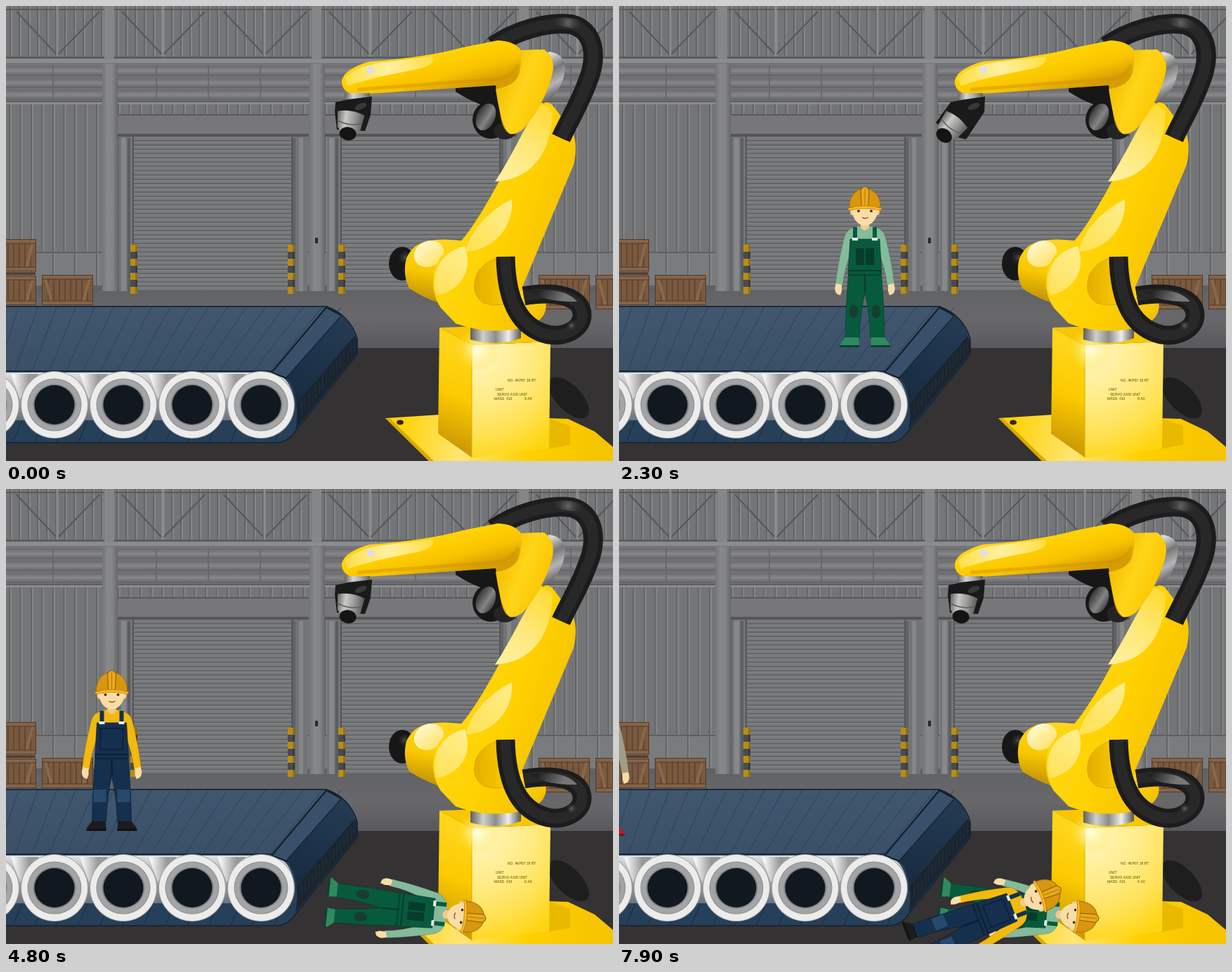
An HTML page with a canvas for the animation above (8000 ms loop, 864 px wide and 648 px high).

```html
<!DOCTYPE html>
<html lang="en">
<head>
<meta charset="utf-8">
<title>Factory line</title>
<style>
html, body { margin: 0; width: 100%; height: 100%; overflow: hidden; background: #343233; }
canvas { display: block; }
</style>
</head>
<body>
<canvas id="stage" width="864" height="648"></canvas>
<script>
const W = 864, H = 648, LOOP = 8000, STEP = 100;
const view = document.getElementById('stage').getContext('2d');
const scene = document.createElement('canvas');
scene.width = W;
scene.height = H;
let g = scene.getContext('2d');

function rect(x, y, w, h, fill) { g.fillStyle = fill; g.fillRect(x, y, w, h); }
function shape(d, fill, line, width = 1) {
  const p = new Path2D(d);
  if (fill) { g.fillStyle = fill; g.fill(p); }
  if (line) { g.strokeStyle = line; g.lineWidth = width; g.stroke(p); }
}
function oval(x, y, rx, ry, fill, turn = 0) {
  g.beginPath();
  g.ellipse(x, y, rx, ry, turn, 0, 7);
  g.fillStyle = fill;
  g.fill();
}
function line(x1, y1, x2, y2, color, width = 1) {
  g.beginPath();
  g.moveTo(x1, y1);
  g.lineTo(x2, y2);
  g.strokeStyle = color;
  g.lineWidth = width;
  g.stroke();
}
function ramp(x1, y1, x2, y2, ...colors) {
  const r = g.createLinearGradient(x1, y1, x2, y2);
  colors.forEach((c, i) => r.addColorStop(i / (colors.length - 1), c));
  return r;
}
function glow(x, y, r, ...colors) {
  const s = g.createRadialGradient(x, y, 0, x, y, r);
  colors.forEach((c, i) => s.addColorStop(i / (colors.length - 1), c));
  return s;
}

// ---- hall ----
function ribs(x, y, w, h, gap) {
  for (let i = x + 4; i < x + w; i += gap) {
    rect(i, y, 2, h, '#626567');
    rect(i + 2, y, 2, h, '#858688');
  }
}
function bay(x) {
  ribs(x, 0, 282, 72, 13);
  line(x, 5, x + 282, 5, '#5a5b5d', 2);
  for (const [a, b] of [[12, 70], [130, 70], [157, 215], [275, 215]])
    line(x + a, 8, x + b, 70, '#55575a', 2);
  line(x + 70, 0, x + 70, 72, '#8c8d8f', 3);
  line(x + 215, 0, x + 215, 72, '#8c8d8f', 3);
  for (let i = 0; i < 3; i++)
    rect(x, 85 + i * 17, 282, 15, ramp(0, 85 + i * 17, 0, 100 + i * 17, '#6a6a6d', '#87878b', '#626265'));
  for (let i = 60; i < 282; i += 74) rect(x + i, 84, 2, 50, '#68696c');
}
function door(x) {
  rect(x - 20, 186, 268, 220, '#737476');
  rect(x - 17, 188, 7, 218, '#87888a');
  rect(x - 8, 188, 4, 218, '#5c5e60');
  rect(x + 226, 188, 5, 218, '#606264');
  rect(x + 236, 188, 6, 218, '#858688');
  rect(x, 186, 226, 221, '#78797b');
  for (let y = 191; y < 405; y += 6.1) {
    rect(x, y, 226, 2, '#616365');
    rect(x, y + 2, 226, 1, '#868788');
  }
  line(x, 186, x, 407, '#545658', 2);
  line(x + 226, 186, x + 226, 407, '#545658', 2);
  rect(x - 24, 154, 274, 31, '#777779');
  rect(x - 24, 154, 274, 2, '#595a5c');
  rect(x - 24, 182, 274, 4, '#545557');
}
function column(x) {
  rect(x, 0, 14, 76, '#858688');
  rect(x - 3, 82, 22, 324, ramp(x - 3, 0, x + 19, 0, '#747576', '#878889', '#838485', '#67686a'));
}
function bollard(x) {
  for (let i = 0; i < 7; i++)
    rect(x, 340 + i * 10, 10, 10, i % 2 ? '#4a4a50' : '#b98c17');
  rect(x + 7, 340, 3, 70, 'rgba(0,0,0,.2)');
}
function crate(x, y, h = 43) {
  rect(x, y, 73, h, '#79593f');
  for (let i = 9; i < 70; i += 8) line(x + i, y + 6, x + i, y + h - 6, '#5c4330', 1.5);
  line(x + 5, y + 5, x + 14, y + h - 5, '#8a694a', 4);
  line(x + 68, y + 5, x + 59, y + h - 5, '#8a694a', 4);
  rect(x, y, 73, 6, '#85644a');
  rect(x, y + h - 6, 73, 6, '#85644a');
  g.strokeStyle = '#503a29';
  g.lineWidth = 1;
  g.strokeRect(x + .5, y + .5, 72, h - 1);
  line(x, y + 6, x + 73, y + 6, '#503a29');
  line(x, y + h - 6, x + 73, y + h - 6, '#503a29');
}
function hall() {
  rect(0, 0, W, 406, '#747577');
  [-142, 153, 448, 743].forEach(bay);
  rect(0, 72, W, 3, '#5b5c5e');
  rect(0, 75, W, 6, '#8b8c8d');
  rect(0, 135, W, 2, '#5b5d5f');
  rect(0, 137, W, 3, '#8a8b8c');
  ribs(0, 140, W, 212, 15.5);
  rect(0, 350, W, 2, '#5e6062');
  rect(0, 352, W, 48, '#7a7b7d');
  ribs(0, 353, W, 46, 31);
  rect(0, 398, W, 8, '#5f6062');
  door(181);
  door(477);
  [140, 435, 730].forEach(column);
  rect(440, 330, 4, 8, '#29292b');
  rect(0, 406, W, 81, ramp(0, 406, 0, 487, '#626366', '#68686b', '#59595d'));
  rect(0, 487, W, 161, '#343233');
  [177, 401, 473].forEach(bollard);
  crate(-30, 332, 46);
  rect(0, 379, 42, 4, '#55402f');
  crate(-30, 384, 42);
  crate(51, 383);
  crate(758, 383, 49);
  crate(839, 383, 49);
}

// ---- conveyor ----
function conveyor() {
  shape('M0 427H456Q490 440 500 474V496L410 608Q400 622 383 622H0Z', '#27405a');
  for (let x = 10; x < 400; x += 31) line(x + 14, 588, x, 621, '#172a3d');
  shape('M0 521H372Q400 522 408 552L360 590H0Z', ramp(0, 521, 0, 592, '#e2e2e2', '#a4a4a4', '#68717b'));
  shape('M0 428H456L378 522H0Z', ramp(0, 428, 0, 522, '#40576f', '#3a5067'));
  for (let x = -10; x < 450; x += 27) {
    const lean = 30 + Math.max(0, x) * .1;
    line(x + 28, 429, x + 28 - lean, 519, '#2d4156');
  }
  shape('M456 429L478 441L399 530L378 522Z', '#38506a', '#111c27', 2);
  shape('M478 441Q491 452 496 470L413 566Q411 540 399 530Z', ramp(470, 450, 415, 560, '#233a52', '#182c41'));
  shape('M496 470Q501 475 500 494L412 603Q416 585 413 566Z', '#1a2530');
  for (let i = 0; i < 16; i++) line(496 - i * 5, 474 + i * 6, 496 - i * 5, 492 + i * 6, '#25333f');
  shape('M0 428H456Q490 440 500 474V496L410 608Q400 622 383 622H0', null, '#142231', 1.5);
  line(0, 520, 380, 520, '#18293a', 2);
  for (let x = -29; x < 400; x += 98) {
    const sheen = ramp(x + 40, 0, x + 62, 0, '#f4f4f4', '#999');
    if (x < 340) shape(`M${x + 36} 524H${x + 76}L${x + 49} 560Z`, sheen);
    oval(x, 568, 48, 48, '#9c9c9c');
    oval(x, 568, 47, 47, '#ececec');
    oval(x, 568, 38.5, 37.5, '#8c8d8f');
    oval(x, 568, 37.5, 36.5, '#a3a4a6');
    oval(x, 568, 30.5, 29.5, '#808285');
    oval(x, 568, 28.5, 28, '#12181f');
  }
}

// ---- robot ----
function hose(d, width) {
  g.lineCap = 'butt';
  shape(d, null, '#1d1c1d', width);
  shape(d, null, '#292829', width * .55);
}
function tinyText(s, x, y) {
  g.font = '5px "Liberation Sans", Arial, sans-serif';
  g.fillStyle = '#5e4a08';
  g.fillText(s, x, y);
}
function base() {
  oval(801, 558, 37, 18, '#1f1e1f', .8);
  shape('M540 587L618 582L800 588L838 606L864 628V648H602Z', ramp(560, 590, 840, 640, '#ffd205', '#ffe573', '#ffd000', '#f6c400'));
  shape('M540 587L602 648H609L547 588Z', '#dba800');
  oval(561, 593, 5, 3.5, '#322909');
  shape('M770 586L803 598V625L770 631Z', '#e9b900');
  shape('M617 458L663 483V643L615 609Z', ramp(655, 490, 612, 615, '#ffd51a', '#fbca00', '#cf9c05'));
  shape('M663 483L775 478L773 630L663 643Z', glow(668, 488, 165, '#fffbe2', '#fff1a3', '#ffea80', '#ffe152', '#ffd510'));
  shape('M617 458L710 455L775 478L663 483Z', '#f8c700');
  line(663, 483, 663, 643, '#e0af00');
  oval(672, 490, 32, 30, glow(672, 490, 32, 'rgba(255,255,225,.95)', 'rgba(255,240,140,.5)', 'rgba(255,220,30,0)'));
  tinyText('NO. 4KP07 18 RT', 714, 535);
  tinyText('UNIT', 697, 548);
  tinyText('SERVO AXIS UNIT', 699, 555);
  tinyText('MASS  410', 695, 561);
  tinyText('6 AX', 738, 561);
  shape('M661 457H733V473Q700 486 661 475Z', ramp(661, 0, 733, 0, '#5f5e5b', '#cfcfcb', '#8d8c88', '#eee', '#55544f'));
}
function lowerArm() {
  oval(564, 367, 19, 24, '#181718');
  oval(568, 360, 9, 12, glow(568, 358, 12, '#4a4a4a', 'rgba(24,23,24,0)'));
  shape('M600 335Q620 330 652 335L640 430Q600 420 574 402Q564 382 570 359Q580 338 600 335Z',
    ramp(610, 332, 594, 425, '#ffd61c', '#f9c800', '#b98a0a'));
  oval(602, 353, 22, 18, ramp(590, 340, 614, 370, '#fff7cc', '#ffe165'), -.45);
  shape('M645 338C680 300 725 205 754 145Q764 132 777 140L805 177Q815 195 808 226L735 400L768 420Q773 444 745 456Q690 471 640 452L619 430Q602 405 611 372Q621 346 645 338Z',
    ramp(645, 300, 780, 350, '#ffd60f', '#ffd100', '#f6c300'));
  shape('M755 145C724 202 710 230 696 250C743 248 777 214 778 150Q766 136 755 145Z', ramp(700, 245, 775, 150, '#fff0a0', '#ffe878', '#ffdb35'));
  shape('M720 275C684 294 660 322 654 350C697 347 723 312 720 275Z', ramp(720, 280, 656, 350, '#ffec8a', '#ffe152'));
  shape('M653 342C617 350 603 384 613 412C646 405 666 378 653 342Z', ramp(650, 340, 614, 410, '#ffee8f', '#ffe258'));
  shape('M718 357Q684 357 670 382Q660 410 680 423Q705 432 730 415Z', ramp(666, 0, 725, 0, '#e3ae00', '#ffd100'), '#d9a800', 1);
  oval(746, 425, 22, 24, ramp(725, 410, 765, 445, '#ffd820', '#f3bf00'));
  hose('M737 413C782 405 820 413 820 440C820 461 794 472 772 468C734 459 712 425 711 357', 27);
  shape('M745 406C780 402 802 407 813 421C785 421 766 419 745 406Z', ramp(760, 404, 790, 422, '#242324', '#777'));
  oval(805, 455, 9, 6, glow(805, 455, 9, '#5f5f5f', 'rgba(30,29,30,0)'), -.7);
}
function upperArm() {
  hose('M694 57C725 35 770 22 804 26C838 34 843 72 827 110C816 140 800 166 790 188', 28);
  oval(802, 24, 25, 7, glow(800, 24, 24, '#656565', 'rgba(40,39,40,0)'), .15);
  shape('M640 117L702 112L708 145Q680 148 640 122Z', '#181718');
  oval(690, 162, 26, 27, '#181718');
  oval(683, 158, 13, 20, ramp(670, 150, 700, 170, '#2c2c2c', '#858585', '#1c1c1c'), .4);
  oval(710, 178, 16, 12, '#252425');
  shape('M772 65Q794 67 796 87Q793 123 765 139L753 130Z', ramp(765, 75, 792, 125, '#d8d8d8', '#777', '#b5b5b5', '#5f5f5f'));
  shape('M700 49Q724 50 733 63L766 62Q782 74 778 95Q770 132 740 171Q729 184 717 182Q708 178 704 158L697 113L532 124L495 126Q477 122 478 106Q482 89 518 79Q600 73 650 59Z',
    ramp(600, 57, 618, 126, '#ffd719', '#ffd000', '#f9c200', '#d69c04'));
  shape('M733 63L766 62Q782 74 778 95Q770 132 740 171Q729 184 717 182Q705 173 697 118Q721 115 729 100Q735 83 733 63Z',
    ramp(705, 100, 770, 125, '#f3bf00', '#ffd51a', '#fac700'));
  shape('M483 103Q494 88 530 81L607 72Q612 84 585 90C550 97 520 102 486 114Z', ramp(485, 105, 605, 75, '#ffe04a', '#fff0a0', '#ffdf48'));
  oval(519, 91, 6, 6, '#e3dfe0');
  shape('M500 119L700 104Q724 98 729 83', null, 'rgba(205,145,0,.45)', 5);
  rect(482, 124, 36, 13, ramp(482, 0, 518, 0, '#646464', '#d4d4d4', '#a5a5a5', '#636363'));
}
function wrist(tilted) {
  shape(tilted ? 'M472 137L486 134L521 129L520 151L494 190L470 184L451 166Z'
               : 'M469 137L487 133L521 129L519 155L511 178L471 176L468 151Z', '#1b1a1b');
  g.save();
  g.translate(tilted ? 473 : 489, tilted ? 171 : 165);
  g.rotate(tilted ? .65 : .14);
  shape('M-19 -13Q0 -19 20 -12L17 10Q10 17 0 18Q-11 17 -16 9Z', ramp(-20, 0, 20, 0, '#5d5d5d', '#c8c8c6', '#979795', '#5b5a59'));
  shape('M-18 0Q0 7 18 0', null, '#625f5c', 1.5);
  oval(0, 17, 12, 9.5, '#151415');
  g.restore();
  oval(505, 143, 9, 4, '#393839', -.4);
}

function flame(long) {
  g.save();
  g.filter = 'blur(9px)';
  shape('M463 168C430 182 385 225 347 275V306C400 300 447 265 464 215Z', 'rgba(151,122,23,.55)');
  g.filter = 'blur(4px)';
  shape('M458 183C420 202 385 235 351 276V306C400 300 438 255 466 188Z', 'rgba(207,73,25,.83)');
  g.filter = 'blur(1px)';
  if (long) {
    shape('M383 268L120 531L394 280Z', ramp(380, 270, 120, 531, 'rgba(255,182,20,.9)', 'rgba(218,85,20,.55)', 'rgba(207,73,25,0)'));
  }
  shape('M457 183Q423 242 350 294L353 303Q435 256 467 187Z', ramp(464, 185, 350, 300, '#ff9b10', '#ffc414', '#ff9c13'));
  shape('M462 185Q428 243 352 297', null, '#ffe252', 3);
  g.restore();
}

// ---- workers, drawn around their middle, 230 px tall ----
const GREEN = { shirt: '#84bb9a', suit: '#075b3c', dark: '#063c2d', shoe: '#2f8a60', sole: '#123f2f', knee: '#153e31' };
const NAVY = { shirt: '#f2b90e', suit: '#15304e', dark: '#0b1d32', shoe: '#1c1b1d', sole: '#111', knee: '#28486c' };
const RED = { shirt: '#a29d86', suit: '#962023', dark: '#65191b', shoe: '#b51d22', sole: '#731316', knee: '#731b1e' };
const SKIN = '#f8dda6';

function half(c) {
  shape('M13 -57Q27 -55 30 -40Q38 -8 42 24L32 27Q29 0 18 -25Z', c.shirt, 'rgba(0,0,0,.18)', .8);
  shape('M33 25L41 23Q45 32 40 38L35 40L33 34Z', SKIN);
  shape('M-1 5H23Q27 50 28 101H8Q7 65 -1 32Z', c.suit, c.dark, .7);
  if (c === NAVY) rect(8, 55, 18, 18, c.knee);
  else oval(16, 63, 6.5, 9.5, c.knee);
  shape('M9 100H28L35 109V112H8Z', c.shoe);
  rect(8, 111, 28, 3, c.sole);
  oval(18, -79, 3, 5, '#f4cc90');
}
function worker(c, x, y, degrees = 0) {
  g.save();
  g.translate(x, y);
  g.rotate(degrees * Math.PI / 180);
  shape('M-18 -56Q0 -62 18 -56L21 0H-21Z', c.shirt);
  g.save();
  half(c);
  g.scale(-1, 1);
  half(c);
  g.restore();
  shape('M-6 -66H6V-56Q0 -49 -6 -56Z', '#f2c98e');
  shape('M-21 -40H21L24 10H-24Z', c.suit, c.dark, .7);
  for (const s of [-17, 11]) {
    rect(s, -57, 6, 20, c.suit);
    rect(s - 1, -42, 8, 4, '#e8ece2');
  }
  g.strokeStyle = c.dark;
  g.lineWidth = 1.5;
  if (c === NAVY) g.strokeRect(-16, -32, 32, 30);
  else {
    rect(-13, -27, 12, 24, c.dark);
    rect(1, -27, 12, 24, c.dark);
  }
  rect(-23, 4, 46, 2, c.dark);
  rect(-23, 11, 46, 1, c.dark);
  line(0, 12, 0, 34, c.dark, 2);
  shape('M-18 -88H18V-77Q14 -61 0 -59Q-14 -61 -18 -77Z', SKIN);
  for (const s of [-1, 1]) {
    oval(s * 9, -80, 2, 1.7, '#38291d');
    line(s * 6, -84, s * 13, -83, '#7b572f', 1.2);
  }
  shape('M-4 -71Q0 -68 5 -71', null, '#9b4b33', 1.4);
  shape('M-22 -85C-23 -121 23 -121 22 -85Z', '#d9960f', '#a06c0c', 1);
  shape('M-6 -110Q0 -119 6 -110L5 -87H-5Z', '#eaa918', '#966309', 1.2);
  line(0, -112, 0, -88, '#b0770e', 1);
  shape('M-24 -84Q0 -91 24 -84L23 -81Q0 -86 -23 -81Z', '#f9ba1d', '#b37a0b', .7);
  g.restore();
}

// ---- timing ----
const fallA = [[455, 425, 55], [540, 515, 85], [569, 585, 94], [569, 600, 96]];
const fallB = [[415, 420, 22], [490, 470, 45], [545, 550, 62], [522, 610, 69]];
const pose = (keys, t, from) => keys[Math.min(keys.length - 1, (t - from) / STEP)];
const enterA = t => t < 1300 ? -40 + (t - 200) * .2245 : Math.min(350, 207 + (t - 1300) * .2383);
const enterB = t => t < 4800 ? 127 + (t - 4700) * .235 : Math.min(344, 150.5 + (t - 4800) * .2764);
const within = (t, a, b) => t >= a && t < b;

function draw(t) {
  g.drawImage(scene, 0, 0);
  wrist(within(t, 2300, 3800) || within(t, 5900, 7400));
  for (const start of [2800, 6400])
    if (within(t, start, start + 1000)) flame(t < start + 200 || (t / STEP) % 2 === 1);
  if (within(t, 200, 3800)) worker(GREEN, enterA(t), 372);
  if (t >= 3800) worker(GREEN, ...pose(fallA, t, 3800));
  if (within(t, 4000, 7400)) worker(NAVY, enterB(t), 373);
  if (t >= 7400) worker(NAVY, ...pose(fallB, t, 7400));
  if (t >= 7900) worker(RED, -28, 380);
}

hall();
conveyor();
base();
lowerArm();
upperArm();
g = view;

function tick() {
  draw(Math.floor(performance.now() % LOOP / STEP) * STEP);
  requestAnimationFrame(tick);
}
tick();
</script>
</body>
</html>
```
